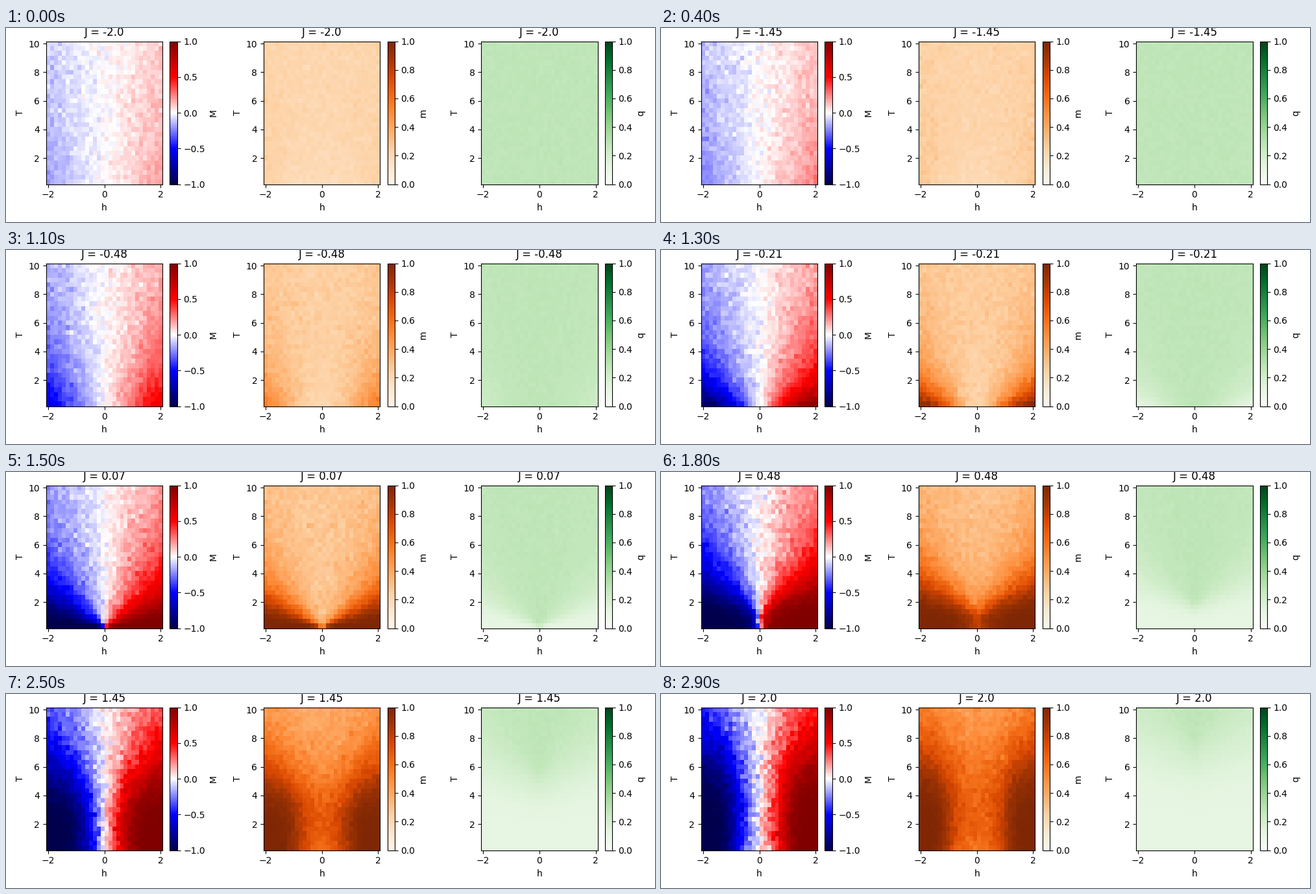
A matplotlib script that plays this animation: 1000 px wide and 300 px high, repeating every 3000 ms.

```python
import math

import numpy as np
import matplotlib.pyplot as plt
from matplotlib.animation import FuncAnimation

FRAMES, INTERVAL = 30, 100
SIZE, SPINS, NEIGHBOURS = 30, 8, 4

couplings = np.linspace(-2, 2, FRAMES)
fields = np.linspace(-2, 2, SIZE)
temps = np.linspace(1 / 3, 10, SIZE)
H, T = np.meshgrid(fields, temps)


def mean_field(strength, temp):
    """Positive root of x = tanh((|h| + strength * x) / temp), by bisection."""
    low, high = np.zeros_like(temp), np.ones_like(temp)
    for _ in range(30):
        mid = (low + high) / 2
        above = np.tanh((np.abs(H) + strength * mid) / temp) > mid
        low, high = np.where(above, mid, low), np.where(above, high, mid)
    return low


def moments(levels, weights):
    weights = weights / weights.sum(axis=-1, keepdims=True)
    return [(weights * x).sum(axis=-1) for x in (levels, np.abs(levels), levels ** 2)]


def antiferro(J):
    temp = np.hypot(T, min(0.9, -1.9 * J))
    order = mean_field(5 * J, temp)
    spread = 0.33 + 0.03 * J - 0.05 * np.exp(-T / 2)
    z = np.linspace(-3, 3, 41)
    levels = (np.sign(H) * order)[..., None] + spread[..., None] * z
    return order, moments(levels, np.exp(-z ** 2 / 2) + 0 * levels)


def ferro(J):
    order = mean_field(NEIGHBOURS * J, T)
    # Slow relaxation at low temperature acts like a raised temperature.
    floor = 2.6 * J ** 1.26 * (1 + 0.2 * np.exp(-T)) / (1 + (H / 1.5) ** 4)
    temp = ((T ** 4 + floor ** 4) ** 0.25)[..., None]
    pull = H * (1 + 0.25 * J * np.exp(-T / 6))
    k = np.arange(SPINS + 1)
    x = 2 * k / SPINS - 1
    count = np.array([math.comb(SPINS, int(i)) for i in k])
    energy = NEIGHBOURS * J * x ** 2 / 2 + pull[..., None] * x
    return order, moments(x, count * np.exp(SPINS * energy / temp))


def simulate(frame):
    J = couplings[frame]
    order, (M, m, square) = antiferro(J) if J < 0 else ferro(J)
    noise = np.random.default_rng(100 + frame).standard_normal((3, SIZE, SIZE))
    q = 0.115 + 0.165 * (1 - order ** 2)
    return (M + noise[0] * np.sqrt(np.maximum(square - M ** 2, 0)) / 9,
            m + noise[1] * np.sqrt(np.maximum(square - m ** 2, 0)) / 11,
            q + noise[2] * 0.03 * (q - 0.1))


plt.rcParams["font.family"] = "DejaVu Sans"
fig, axes = plt.subplots(1, 3, figsize=(10, 3), dpi=100)
panels = [("M", "seismic", -1), ("m", "Oranges", 0), ("q", "Greens", 0)]
meshes = []
for ax, (name, cmap, vmin), data in zip(axes, panels, simulate(0)):
    mesh = ax.pcolormesh(fields, temps, data, cmap=cmap, vmin=vmin, vmax=1,
                         shading="nearest")
    ax.set_xlabel("h")
    ax.set_ylabel("T")
    fig.colorbar(mesh, ax=ax, label=name)
    meshes.append(mesh)
fig.tight_layout()


def update(frame):
    for ax, mesh, data in zip(axes, meshes, simulate(frame)):
        mesh.set_array(data)
        ax.set_title(f"J = {round(float(couplings[frame]), 2)}")
    return meshes


anim = FuncAnimation(fig, update, frames=FRAMES, interval=INTERVAL,
                     repeat=True, repeat_delay=0)
plt.show()
```
